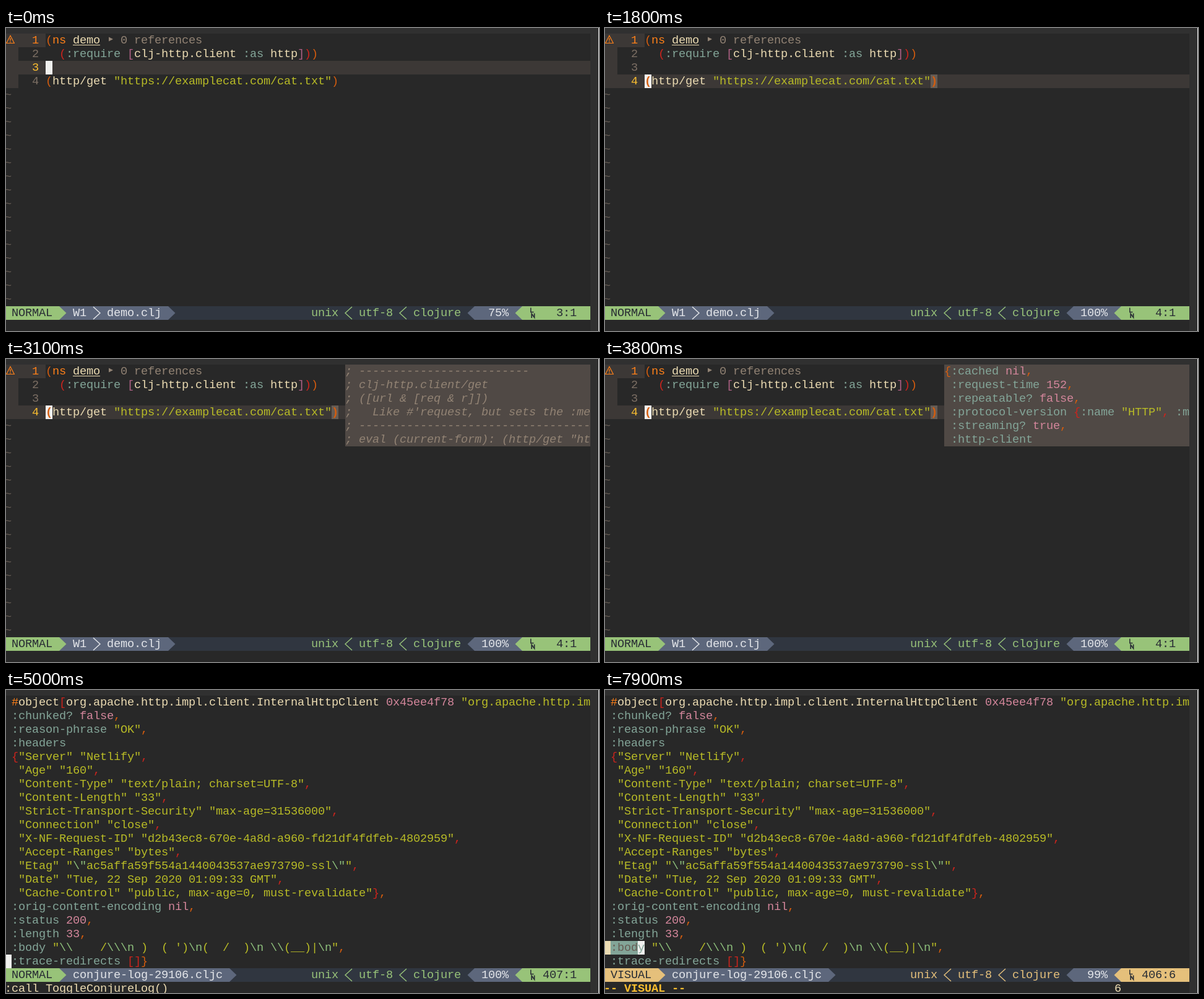
These frames come from a looping animation (958x489 px, 8 s). An HTML page:

```html
<!DOCTYPE html>
<html lang="en">
<head>
<meta charset="utf-8">
<title>Clojure in the editor</title>
<style>
  html, body { margin: 0; width: 100%; height: 100%; overflow: hidden; background: #282828; }
  #stage { position: relative; width: 958px; height: 489px; overflow: hidden; background: #303030; }
  #stage > * { position: absolute; }
  .t {
    font: 14pt/22px "Liberation Mono", monospace;
    letter-spacing: calc(11px - 1ch);
    white-space: pre;
    height: 22px;
  }
  .b { font-weight: bold; }
  .i { font-style: italic; }
  u { text-underline-offset: 2px; text-decoration-thickness: 1px; }
  svg { left: 0; top: 0; }
</style>
</head>
<body>
<div id="stage"></div>
<script>
const LOOP = 8000, CW = 11, CH = 22, COLS = 86;
const C = {
  bg: '#282828', line: '#3c3836', pop: '#504945', match: '#665c54', dim: '#7c6f64', gray: '#928374',
  fg: '#ebdbb2', orange: '#fe8019', yellow: '#fabd2f', str: '#b8bb26', esc: '#8ec07c',
  key: '#83a598', lit: '#d3869b', cursor: '#f0f0ee',
  green: '#98c379', gold: '#e5c07b', ink: '#282c34', mid: '#303640', slate: '#5d677c', pale: '#e4e6ea'
};
const DEPTH = ['#d65d0e', '#cc241d', '#b16286'];

const X = col => CW * col - 2;
const Y = row => 9 + CH * row;
const safe = s => s.replace(/&/g, '&amp;').replace(/</g, '&lt;');
const ink = (color, s) => `<span style="color:${color}">${safe(s)}</span>`;

const box = (x, y, w, h, color) =>
  `<div style="left:${x}px;top:${y}px;width:${w}px;height:${h}px;background:${color}"></div>`;
const cells = (col, row, n, color) => box(X(col), Y(row), n * CW, CH, color);
const put = (col, row, html, color = C.fg, cls = '') =>
  `<div class="t ${cls}" style="left:${X(col)}px;top:${Y(row)}px;color:${color}">${html}</div>`;
const svg = body => `<svg width="958" height="489">${body}</svg>`;
const fill = (d, color) => `<path d="${d}" fill="${color}"/>`;
const stroke = (d, color, w) => `<path d="${d}" fill="none" stroke="${color}" stroke-width="${w}"/>`;

// Clojure colouring with brackets and commas tinted by nesting depth.
const TOKEN = /"(?:\\.|[^"\\])*"?|:[\w?.\/-]+|(?:0x[\da-f]+|\d+|nil|true|false)\b|ns\b|#|[\w.\/-]+|[(\[{]|[)\]}]|,|\s+/g;
function paint(lines, depth, width) {
  return lines.map(line => {
    const start = depth;
    const html = line.match(TOKEN).map(s => {
      if (s[0] === '"') return s.split(/(\\.)/).map(p => ink(p[0] === '\\' ? C.esc : C.str, p)).join('');
      if (s[0] === ':') return ink(C.key, s);
      if (/^(0x|\d|nil|true|false)/.test(s)) return ink(C.lit, s);
      if (s === 'ns' || s === '#') return ink(C.orange, s);
      if (s === 'demo') return '<u>demo</u>';
      if (/[(\[{]/.test(s)) return ink(DEPTH[depth++], s);
      if (/[)\]}]/.test(s)) return ink(DEPTH[--depth], s);
      if (s === ',') return ink(DEPTH[depth - 1], s);
      return safe(s);
    }).join('');
    if (line.length >= width) depth = start; // closes beyond the edge
    return html;
  });
}

const CODE = paint([
  '(ns demo',
  '  (:require [clj-http.client :as http]))',
  ' ',
  '(http/get "https://examplecat.com/cat.txt")'
], 0, COLS);

const DOC = [
  '; ' + '-'.repeat(25),
  '; clj-http.client/get',
  '; ([url & [req & r]])',
  ";   Like #'request, but sets the :me",
  '; ' + '-'.repeat(34),
  '; eval (current-form): (http/get "ht'
].map(safe);

const RESULT = paint([
  '{:cached nil,',
  ' :request-time 152,',
  ' :repeatable? false,',
  ' :protocol-version {:name "HTTP", :m',
  ' :streaming? true,',
  ' :http-client'
], 0, 35);

const LOG = paint(String.raw`#object[org.apache.http.impl.client.InternalHttpClient 0x45ee4f78 "org.apache.http.im
:chunked? false,
:reason-phrase "OK",
:headers
{"Server" "Netlify",
 "Age" "160",
 "Content-Type" "text/plain; charset=UTF-8",
 "Content-Length" "33",
 "Strict-Transport-Security" "max-age=31536000",
 "Connection" "close",
 "X-NF-Request-ID" "d2b43ec8-670e-4a8d-a960-fd21df4fdfeb-4802959",
 "Accept-Ranges" "bytes",
 "Etag" "\"ac5affa59f554a1440043537ae973790-ssl\"",
 "Date" "Tue, 22 Sep 2020 01:09:33 GMT",
 "Cache-Control" "public, max-age=0, must-revalidate"},
:orig-content-encoding nil,
:status 200,
:length 33,
:body "\\    /\\\n )  ( ')\n(  /  )\n \\(__)|\n",
:trace-redirects []}`.split('\n'), 1, 85);

function status(mode, color, file, warn, pct, pos) {
  const row = 20, top = Y(row), low = top + CH, half = top + CH / 2;
  const end = (warn ? 15 : 10) + file.length + 1;
  const right = (col, c) => fill(`M${X(col)} ${top}l11.5 11l-11.5 11z`, c);
  const left = (col, c) => fill(`M${X(col + 1)} ${top}l-11.5 11l11.5 11z`, c);
  const thin = (col, dir, c) => {
    const a = X(dir > 0 ? col : col + 1);
    return stroke(`M${a} ${top + 1}L${a + dir * 11} ${half}L${a} ${low - 1}`, c, 1.4);
  };
  const n = s => s.length;
  return cells(0, row, COLS, C.mid)
    + cells(0, row, 8, color) + cells(8, row, end - 8, C.slate)
    + cells(69, row, 7, C.slate) + cells(76, row, 10, color)
    + svg(right(8, color) + right(end, C.slate) + left(68, C.slate) + left(75, color)
      + (warn ? thin(13, 1, C.pale) : '') + thin(50, -1, color) + thin(58, -1, color)
      + stroke('M847.8 451.5V458.5H852.5', C.ink, 1.5)
      + stroke('M849.2 468V461.2L853.6 467.2V460.5', C.ink, 1.7))
    + put(1, row, mode, C.ink)
    + (warn ? put(10, row, 'W1', C.pale) : '')
    + put(warn ? 15 : 10, row, file, C.pale)
    + put(45, row, 'unix', color) + put(52, row, 'utf-8', color) + put(60, row, 'clojure', color)
    + put(74 - n(pct), row, pct, C.pale) + put(84 - n(pos), row, pos, C.ink);
}

const base = box(0, 9, 944, 480, C.bg) + box(957, 0, 1, 489, '#f4f4f4');

function popup(lines, color, cls) {
  return cells(50, 0, 36, C.pop) + lines.map((s, r) => put(50, r, s, color, cls)).join('');
}

function editor(cur, keys = '', pop = '') {
  let out = base + box(0, 9, 20, 4 * CH, C.line) + box(20, 9, 44, CH, C.line) + cells(0, cur, COLS, C.line);
  CODE.forEach((s, r) => {
    out += put(4, r, r + 1, r === cur ? C.yellow : r ? C.dim : C.orange) + put(6, r, s);
  });
  for (let r = 4; r < 20; r++) out += put(0, r, '~', C.match);
  out += put(17, 0, '0 references', C.gray)
    + svg(fill('M166 14.5L173 18L166 21.5z', C.gray)
      + stroke('M7 12.2L13.3 24.5H.7z', C.orange, 1.2)
      + stroke('M7 16.3V20.6M7 21.8V23.3', C.orange, 1.4));
  out += cells(6, cur, 1, C.cursor);
  if (cur === 3) {
    out += put(6, 3, '(', DEPTH[0], 'b') + cells(48, 3, 1, C.match) + put(48, 3, ')', DEPTH[0], 'b');
  }
  if (pop) {
    const [lines, color, cls] = pop;
    out += box(X(50), Y(0), 396, 6 * CH, C.pop) + popup(lines, color, cls);
  }
  return out + status('NORMAL', C.green, 'demo.clj', true, cur === 3 ? '100%' : '75%', `${cur + 1}:1`)
    + put(75, 21, keys);
}

function log(row, col = 0, visual = false) {
  let out = base + LOG.map((s, r) => put(1, r, s)).join('');
  const word = ' :body';
  if (col) {
    out += cells(0, row, 1, C.fg) + cells(1, row, col - 1, C.key)
      + put(1, row, word.slice(1, col), C.match);
  }
  out += cells(col, row, 1, C.cursor) + put(col, row, word[col], C.key);
  return out + status(visual ? 'VISUAL' : 'NORMAL', visual ? C.gold : C.green, 'conjure-log-29106.cljc',
      false, row === 19 ? '100%' : '99%', `${388 + row}:${col + 1}`)
    + (visual ? put(0, 21, '-- VISUAL --', C.yellow, 'b') + put(75, 21, col + 1)
              : put(0, 21, ':call ToggleConjureLog()'));
}

const doc = [DOC, C.gray, 'i'], result = [RESULT, C.fg, ''];
const STEPS = [
  [0, editor(2)],
  [1800, editor(3)],
  [2800, editor(3, '\\')],
  [2900, editor(3, '\\e')],
  [3100, editor(3, '', doc)],
  [3300, editor(3, '', result)],
  [4800, editor(3, '\\', result)],
  [4900, editor(3, '\\c', result)],
  [5000, log(19)],
  [6900, log(18)],
  [7100, log(18, 0, true)],
  [7400, log(18, 5, true)]
];

const stage = document.getElementById('stage');
const start = performance.now();
let shown = -1;
function draw() {
  const t = (performance.now() - start) % LOOP;
  const i = STEPS.findLastIndex(([at]) => at <= t);
  if (i !== shown) stage.innerHTML = STEPS[shown = i][1];
  requestAnimationFrame(draw);
}
draw();
</script>
</body>
</html>
```
